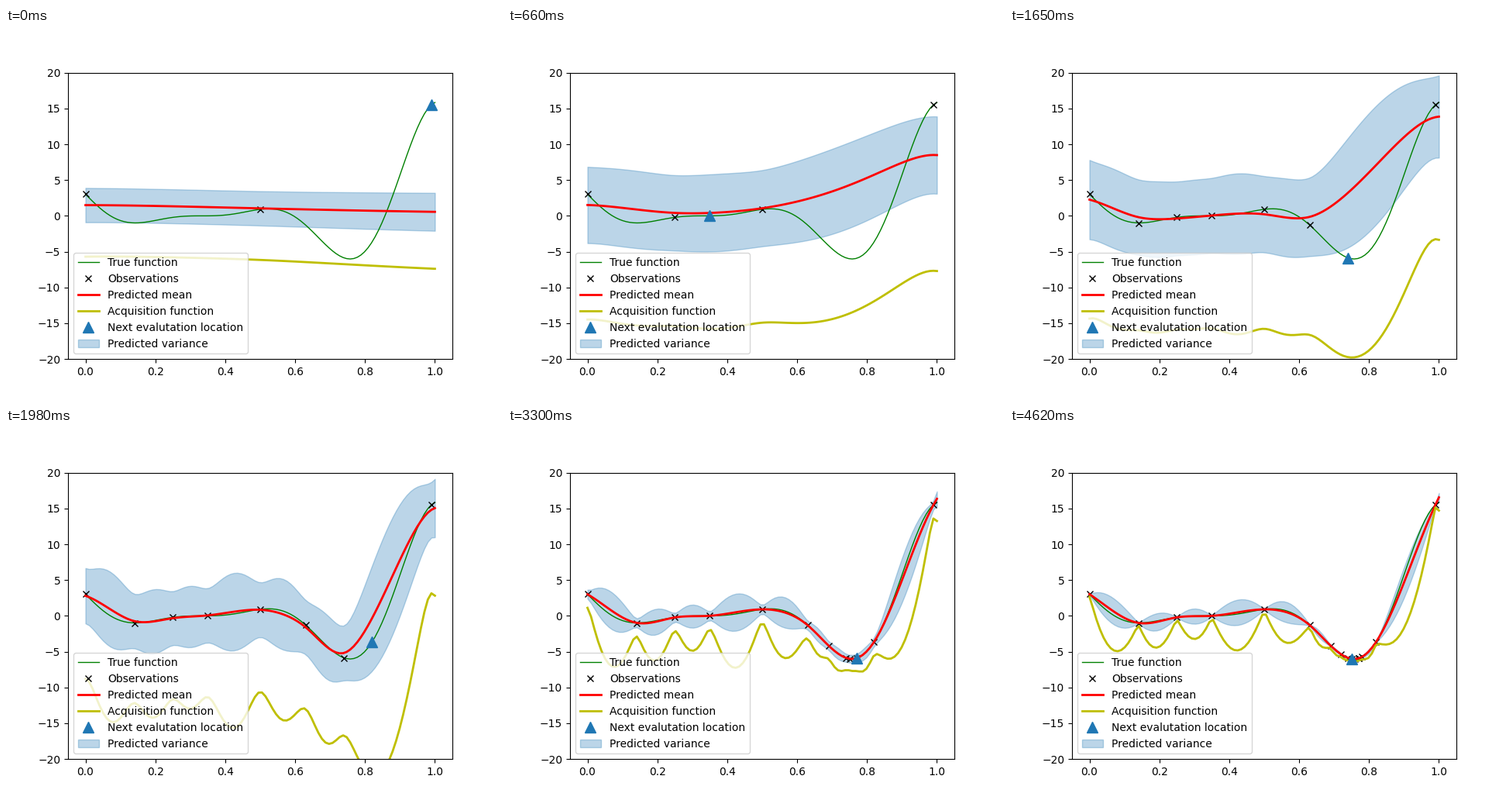
Recreate the animation shown at these times as a matplotlib script. Size 640x480 px, loop 4950 ms.

```python
import numpy as np
import matplotlib.pyplot as plt
from matplotlib.animation import FuncAnimation

STEP_MS = 330
FRAMES = 15

# Two starting points, then the location chosen at each step.
SAMPLES = np.array([0, .5, .99, .25, .35, .14, .63, .74, .82, .69,
                    .77, .75, .77, .78, .72, .76, .75])

# Key points of the training: step, length scale, signal and noise variance.
TRAINING = np.array([
    (0, .883, 4.24, 4.03),
    (2, .257, 22.9, 18.8),
    (4, .404, 117, 37.7),
    (6, .202, 222, 7.7),
    (8, .285, 390, 1.35),
    (10, .424, 720, .2),
    (14, .693, 1520, .008),
])


def objective(x):
    return (6 * x - 2) ** 2 * np.sin(12 * x - 4)


def settings(step):
    """Kernel settings, moving at a steady rate on a log scale."""
    keys = TRAINING[:, 0]
    return [np.exp(np.interp(step, keys, np.log(column)))
            for column in TRAINING[:, 1:].T]


def matern32(a, b, length, signal):
    t = np.sqrt(3) * np.abs(a[:, None] - b[None, :]) / length
    return signal * (1 + t) * np.exp(-t)


def predict(x, obs, length, signal, noise):
    """Gaussian process mean and standard deviation, noise included."""
    gram = matern32(obs, obs, length, signal) + noise * np.eye(len(obs))
    cross = matern32(obs, x, length, signal)
    weights = np.linalg.solve(gram, cross)
    mean = weights.T @ objective(obs)
    var = signal + noise - np.sum(cross * weights, axis=0)
    return mean, np.sqrt(var)


grid = np.linspace(0, 1, 100)

fig, ax = plt.subplots(figsize=(6.4, 4.8), dpi=100)
ax.plot(grid, objective(grid), "g", lw=1, label="True function")
points, = ax.plot([], [], "kx", label="Observations")
mean_line, = ax.plot([], [], "r", lw=2, label="Predicted mean")
acq_line, = ax.plot([], [], "y", lw=2, label="Acquisition function")
next_mark, = ax.plot([], [], "^", color="C0", ms=10,
                     label="Next evalutation location")
band = ax.fill_between(grid, -1, 1, color="C0", alpha=.3,
                       label="Predicted variance")
ax.set_xlim(-.05, 1.05)
ax.set_ylim(-20, 20)
ax.legend(loc="lower left")


def update(step):
    obs, target = SAMPLES[:step + 2], SAMPLES[step + 2]
    mean, std = predict(grid, obs, *settings(step))
    points.set_data(obs, objective(obs))
    mean_line.set_data(grid, mean)
    acq_line.set_data(grid, mean - 3 * std)
    next_mark.set_data([target], [objective(target)])
    upper = np.column_stack([grid, mean + std])
    lower = np.column_stack([grid, mean - std])
    band.set_verts([np.vstack([upper, lower[::-1]])])
    return points, mean_line, acq_line, next_mark, band


anim = FuncAnimation(fig, update, frames=FRAMES, interval=STEP_MS,
                     init_func=lambda: update(0), repeat=True, repeat_delay=0)
plt.show()
```
